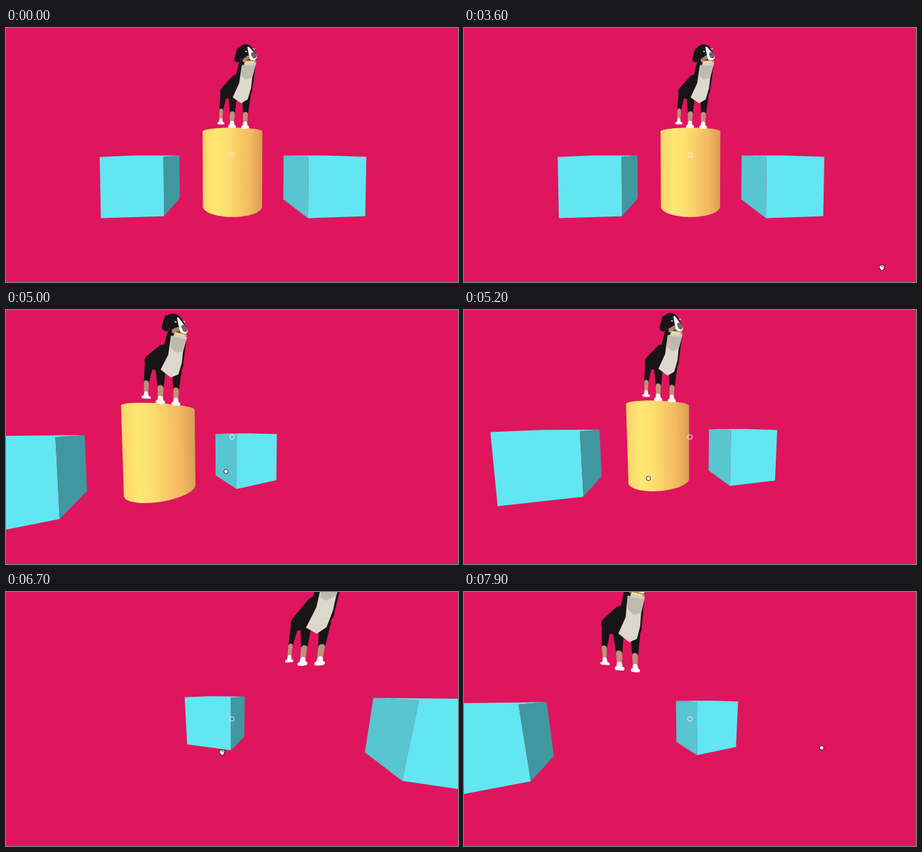
Animation of 690 by 388 pixels, one loop 8 s. Source, as an HTML page with a canvas:

```html
<!DOCTYPE html>
<html lang="en">
<head>
<meta charset="utf-8">
<title>Dog on a pedestal</title>
<style>
html, body { margin: 0; width: 100%; height: 100%; overflow: hidden; background: #df155d; }
canvas { display: block; width: 100vw; height: 100vh; }
</style>
</head>
<body>
<canvas id="stage" width="690" height="388"></canvas>
<script>
const ctx = document.getElementById('stage').getContext('2d');
const LOOP = 8000, CX = 345, CY = 194;
const FOCAL = CY / Math.tan(rad(40)); // 80 degree field of view
const GRAB = 4520, RELEASE = 5720, HIDE = 6500, REGRAB = 6800;

// time, yaw, pitch, pointer x, pointer y
const keys = [
  [3750, 0, 1.2, 638, 366],
  [GRAB, 0, 1.2, 236, 241],
  [5010, 25.1, 2.6, 336, 247],
  [5500, -19.5, 7.9, 156, 279],
  [RELEASE, -23.95, 9.7, 139, 286],
  [6450, -23.95, 9.7, 330, 245],
  [REGRAB, -23.95, 9.7, 330, 245],
  [7500, 3.2, 13.2, 478, 257],
  [7900, 24.1, 8.1, 546, 238]
];

function rad(deg) { return deg * Math.PI / 180; }

// Monotone cubic through column k of the keys
function sample(t, k) {
  const last = keys.length - 1;
  if (t <= keys[0][0]) return keys[0][k];
  if (t >= keys[last][0]) return keys[last][k];
  const i = keys.findIndex(key => key[0] > t) - 1;
  const secant = j => (keys[j + 1][k] - keys[j][k]) / (keys[j + 1][0] - keys[j][0]);
  const slope = j => {
    if (j === 0) return 0;
    if (j === last) return secant(j - 1);
    const a = secant(j - 1), b = secant(j);
    return a * b <= 0 ? 0 : 2 * a * b / (a + b);
  };
  const h = keys[i + 1][0] - keys[i][0], u = (t - keys[i][0]) / h, v = 1 - u;
  return keys[i][k] * v * v * (1 + 2 * u) + keys[i + 1][k] * u * u * (3 - 2 * u)
    + h * u * v * (slope(i) * v - slope(i + 1) * u);
}

// World: x right, y up, z ahead, with the camera at the origin
let yaw = 0, pitch = 0;
function project([x, y, z]) {
  const side = x * Math.cos(yaw) - z * Math.sin(yaw);
  const ahead = x * Math.sin(yaw) + z * Math.cos(yaw);
  const depth = ahead * Math.cos(pitch) - y * Math.sin(pitch);
  const up = y * Math.cos(pitch) + ahead * Math.sin(pitch);
  return [CX + FOCAL * side / depth, CY - FOCAL * up / depth];
}

function face(fill, points) {
  ctx.beginPath();
  points.forEach(p => ctx.lineTo(...project(p)));
  ctx.closePath();
  ctx.fillStyle = fill;
  ctx.fill();
}

// x is the near left corner; innerSide is 0 (left) or 1 (right)
function box(x, innerSide, shade) {
  const width = 1.025, top = -0.085, bottom = -1.11, tilt = 0.075;
  const at = (u, y, v) => [x + width * u - tilt * v, y, 2.513 + tilt * u + v];
  const s = innerSide;
  face('#62e6f1', [at(0, bottom, 0), at(0, top, 0), at(0, top, 1), at(1, top, 1), at(1, top, 0), at(1, bottom, 0)]);
  face(shade, [at(s, bottom, 0), at(s, top, 0), at(s, top, 1), at(s, bottom, 1)]);
}

function cylinder() {
  const r = 0.5, z = 2.59, edge = Math.acos(r / z), steps = 32;
  const at = (a, y) => [0.008 + r * Math.sin(a), y, z - r * Math.cos(a)];
  const top = [], bottom = [];
  for (let i = 0; i <= steps; i++) {
    const a = edge * (2 * i / steps - 1);
    top.push(at(a, 0.333));
    bottom.unshift(at(a, -0.908));
  }
  const fill = ctx.createLinearGradient(...project(at(-edge, -0.2)), ...project(at(edge, -0.2)));
  ['#f9d468', '#fee873', '#fde071', '#f9cc67', '#f2b960', '#d99f52']
    .forEach((c, i) => fill.addColorStop(i / 5, c));
  face(fill, [...top, ...bottom]);
}

// The dog is drawn in stage pixels on an upright board on the pedestal.
function board(x, y) {
  const h = (189.2 - y) / 100;
  return [(x - CX) / 100, h, FOCAL / 100 + 0.021 * h];
}

function patch(color, points) {
  face(color, points.map(p => board(...p)));
}

// Rounded part tapering from radius r1 to r2
function limb(color, x1, y1, r1, x2, y2, r2) {
  const dir = Math.atan2(y2 - y1, x2 - x1), points = [];
  for (let i = 0; i < 24; i++) {
    const a = (i + 0.5) * Math.PI / 12, far = Math.cos(a) > 0;
    const [x, y, r] = far ? [x2, y2, r2] : [x1, y1, r1];
    points.push([x + r * Math.cos(a + dir), y + r * Math.sin(a + dir)]);
  }
  patch(color, points);
}

function leg(hipX, hipY, x, y, size) {
  const knee = y - 21;
  limb('#171516', hipX, hipY, 6.5 * size, x + 0.5, knee, 3.8 * size);
  limb('#bd9378', x + 0.5, knee, 3.8 * size, x, y - 8, 3.2 * size);
  limb('#fbf8f7', x, y - 7, 3.2 * size, x, y - 3, 4 * size);
  limb('#fbf8f7', x - 3.5, y - 1.5, 2.5 * size, x + 3.5, y - 1.5, 2.5 * size);
}

function dog() {
  const black = '#171516', white = '#fbf8f7';
  leg(332, 103, 328, 147, 0.75);
  leg(346, 105, 345, 152, 1);
  leg(367, 104, 365, 153, 1);
  // body and chest
  limb(black, 337, 98, 10, 353, 83, 12);
  limb(black, 343, 98, 10, 361, 93, 15);
  limb(black, 361, 93, 15, 368, 57, 13);
  const neck = [[360, 57], [382, 53], [376, 75]];
  patch('#dcd9cc', [...neck, [374, 92], [369, 109], [359, 115], [346, 106], [356, 84]]);
  patch('#bfbaad', [...neck, [366, 79], [359, 73]]);
  // head
  limb(black, 366, 37, 12, 371, 45, 11.5);
  limb(black, 357, 35, 5, 353, 48, 4.5);
  limb('#9d846e', 363, 49, 2, 370, 45, 3);
  limb(white, 370, 30, 1.5, 377, 44, 6);
  limb('#67646a', 377, 40, 3, 379, 43, 3.5);
  limb('#d6cec0', 366, 55, 2.5, 378, 54, 3);
  limb('#c6964f', 363, 51, 1.5, 380, 51, 2);
  limb('#efdfb6', 366, 52, 1, 378, 52, 1.2);
  limb('#b9c5da', 366, 36, 1, 367, 36, 1);
  limb('#b9c5da', 378, 32, 1, 379, 32, 1);
}

function reticle() {
  ctx.beginPath();
  ctx.arc(CX, CY, 3.3, 0, 2 * Math.PI);
  ctx.strokeStyle = 'rgba(255,232,232,.8)';
  ctx.lineWidth = 1.3;
  ctx.stroke();
}

function hand(x, y, closed) {
  const shape = new Path2D();
  shape.arc(0, closed ? 0 : 1, 2.7, 0, 2 * Math.PI);
  // fingers fan out from the palm
  for (let i = 0; i < 5 && !closed; i++) {
    const a = Math.PI * (1.05 + i * 0.2);
    shape.moveTo(0, 0);
    shape.arc(3.2 * Math.cos(a), 3.2 * Math.sin(a), 0.9, 0, 2 * Math.PI);
  }
  ctx.save();
  ctx.translate(x, y);
  ctx.lineWidth = 1.6;
  ctx.strokeStyle = '#240812';
  ctx.stroke(shape);
  ctx.fillStyle = '#fff';
  ctx.fill(shape);
  ctx.restore();
}

function draw(t) {
  yaw = rad(sample(t, 1));
  pitch = rad(sample(t, 2));
  ctx.fillStyle = '#df155d';
  ctx.fillRect(0, 0, 690, 388);
  box(-2.196, 1, '#41979f');
  box(1.272, 0, '#57c6d0');
  if (t < HIDE) cylinder();
  dog();
  reticle();
  const dragging = (t >= GRAB && t < RELEASE) || t >= REGRAB;
  if (t >= 3600) hand(sample(t, 3), sample(t, 4), dragging);
}

let start;
function frame(now) {
  start ??= now;
  draw((now - start) % LOOP);
  requestAnimationFrame(frame);
}
requestAnimationFrame(frame);
</script>
</body>
</html>
```
